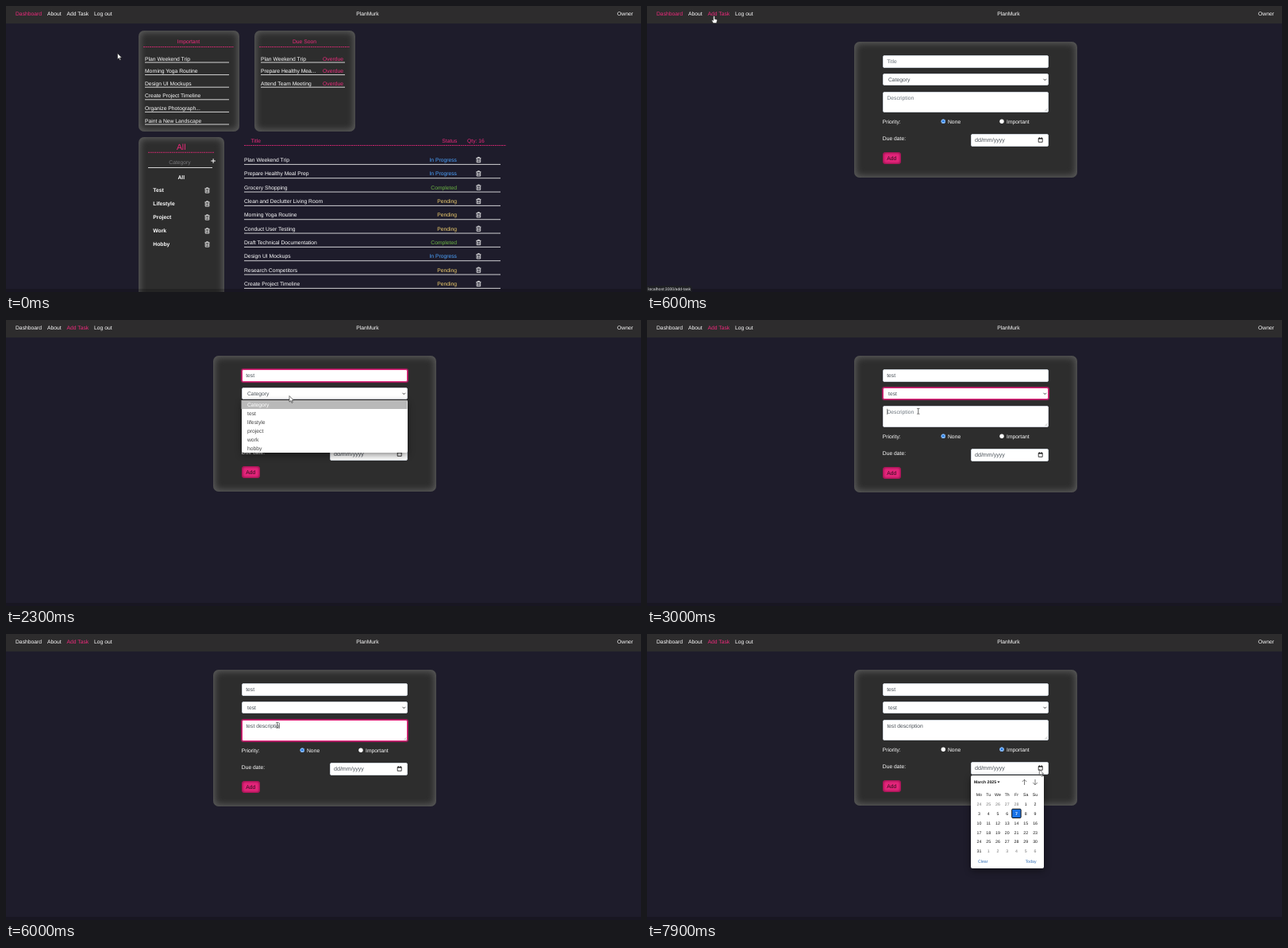
Write an HTML page that moves like this. It is 800 by 360 pixels and loops after 8 s.

```html
<!DOCTYPE html>
<html lang="en">
<head>
<meta charset="utf-8">
<title>Task manager</title>
<style>
  html, body { margin: 0; width: 100%; height: 100%; overflow: hidden; background: #1e1c2b; }
  #stage { position: relative; width: 800px; height: 360px; overflow: hidden; background: #1e1c2b; }
  #stage div, #stage svg { position: absolute; box-sizing: border-box; }
  #stage .layer, #stage .layer > svg { left: 0; top: 0; width: 800px; height: 360px; }
  svg { overflow: visible; }
  text { font: 6.75px "Liberation Sans", Arial, sans-serif; text-rendering: geometricPrecision; white-space: pre; }
  .card { background: #2d2d2d; border-radius: 7px; box-shadow: inset 0 0 9px 2px #5e5e5e; }
  .field { background: #fff; border-radius: 2px; border: .5px solid #ced4da; }
  .ring { border-radius: 2px; border: 1px solid #e0267b; box-shadow: 0 0 1px 1px #a31c5c; opacity: 0; }
  .add { background: #e3257a; border-radius: 4px; box-shadow: inset 0 0 3px 1px #8c0f48; }
  .list { background: #fff; border-radius: 2px; box-shadow: 0 3px 8px rgba(0, 0, 0, .45); }
</style>
</head>
<body>
<div id="stage"></div>
<script>
const PINK = '#ee2a7c', GRAY = '#6c757d', INK = '#495057';
const LOOP = 8000;
const $ = id => document.getElementById(id);

// Markup helpers; text is placed by its left, middle or right x and its centre y.
const text = (x, y, s, o = {}) => {
  const size = o.size || 6.75;
  return `<text x="${x}" y="${y + size * .355}" fill="${o.fill || '#fff'}" text-anchor="${o.at || 'start'}"
    style="font-size:${size}px;font-weight:${o.bold ? 700 : 400}" ${o.id ? `id="${o.id}"` : ''}>${s}</text>`;
};
const line = (x1, x2, y, color = '#fff', dash = '') =>
  `<path d="M${x1} ${y}H${x2}" stroke="${color}" stroke-width=".8" stroke-dasharray="${dash}"/>`;
const rule = (x1, x2, y) => line(x1, x2, y, PINK, '2 .7');
const box = (cls, x, y, w, h, id = '') =>
  `<div class="${cls}" id="${id}" style="left:${x}px;top:${y}px;width:${w}px;height:${h}px"></div>`;
const layer = (id, boxes, shapes) =>
  `<div class="layer" id="${id}">${boxes}<svg>${shapes}</svg></div>`;
const trash = (x, y) => `<g transform="translate(${x} ${y})" fill="none" stroke="#fff" stroke-width=".8">
  <path d="M-3-2.2H3M-1-2.4V-3.2H1V-2.4M-2.3-2V3.1H2.3V-2M-.8-.8V2M.8-.8V2"/></g>`;

function dashboard() {
  const important = ['Plan Weekend Trip', 'Morning Yoga Routine', 'Design UI Mockups',
    'Create Project Timeline', 'Organize Photograph...', 'Paint a New Landscape'];
  const due = ['Plan Weekend Trip', 'Prepare Healthy Mea...', 'Attend Team Meeting'];
  const status = { I: ['In Progress', '#4da3ff'], C: ['Completed', '#6cb644'], P: ['Pending', '#f2d06f'] };
  const tasks = ['I Plan Weekend Trip', 'I Prepare Healthy Meal Prep', 'C Grocery Shopping',
    'P Clean and Declutter Living Room', 'P Morning Yoga Routine', 'P Conduct User Testing',
    'C Draft Technical Documentation', 'I Design UI Mockups', 'P Research Competitors',
    'P Create Project Timeline'];
  let s = text(230, 44.5, 'Important', { fill: PINK, at: 'middle' }) + rule(173, 287, 51.5)
    + text(376, 44.5, 'Due Soon', { fill: PINK, at: 'middle' }) + rule(319, 433, 51.5);
  important.forEach((name, i) => {
    const y = 66.2 + i * 15.6;
    s += text(175, y, name) + line(175, 281, y + 4.8);
  });
  due.forEach((name, i) => {
    const y = 66.2 + i * 15.6;
    s += text(321, y, name) + text(399, y, 'Overdue', { fill: PINK }) + line(321, 427, y + 4.8);
  });
  s += text(220.7, 177, 'All', { fill: PINK, size: 10.4, at: 'middle' }) + rule(179, 262, 184.3)
    + text(219, 196.2, 'Category', { fill: '#77777a', at: 'middle' }) + line(179, 260, 203.5)
    + '<path d="M258.3 195H263.9M261.1 192.2V197.8" stroke="#fff"/>'
    + text(220.7, 215.2, 'All', { bold: 1, at: 'middle' });
  ['Test', 'Lifestyle', 'Project', 'Work', 'Hobby'].forEach((name, i) => {
    const y = 232 + i * 17;
    s += text(185.3, y, name, { bold: 1 }) + trash(253.5, y);
  });
  s += text(308.5, 169.6, 'Title', { fill: PINK }) + text(568.5, 169.6, 'Status', { fill: PINK, at: 'end' })
    + text(581, 169.6, 'Qty: 16', { fill: PINK }) + rule(300, 630, 175.5);
  tasks.forEach((task, i) => {
    const y = 193.6 + i * 17.33, [label, fill] = status[task[0]];
    s += text(300, y, task.slice(2)) + text(568, y, label, { fill, at: 'end' })
      + trash(595.4, y) + line(300, 623, y + 5.8);
  });
  return layer('dash', box('card', 167, 31, 127, 127) + box('card', 313, 31, 127, 127)
    + box('card', 167, 165, 108, 220), s);
}

function form() {
  const radio = (x, id) => `<circle cx="${x}" cy="145.2" r="2.7" fill="#fff"/>
    <g id="${id}"><circle cx="${x}" cy="145.2" r="2.3" fill="#fff" stroke="#1976e8" stroke-width=".8"/>
    <circle cx="${x}" cy="145.2" r="1.4" fill="#1976e8"/></g>`;
  const top = layer('top',
    box('card', 261, 45, 281, 171, 'card')
    + box('field', 296.5, 62, 209, 15.5) + box('field', 296.5, 84.8, 209, 15.7)
    + box('field', 296.5, 107.6, 209, 26, 'area')
    + box('ring', 296.5, 62, 209, 15.5, 'ring0') + box('ring', 296.5, 84.8, 209, 15.7, 'ring1')
    + box('ring', 296.5, 107.6, 209, 27, 'ring2'),
    text(302.2, 69.8, '', { id: 'title' })
    + text(304, 92.9, '', { id: 'category', fill: INK })
    + '<path d="M499.6 91.8L501.3 93.6L503 91.8" fill="none" stroke="#333" stroke-width=".9"/>'
    + text(302.4, 115.4, '', { id: 'desc' })
    + '<path id="caret" stroke="#222" stroke-width=".6"/>'
    + '<path id="grip" d="M501.3 132.3L504.3 129.3M503 132.3L504.3 131" stroke="#888" stroke-width=".5"/>');
  const low = layer('low',
    box('field', 407.5, 160.8, 98, 15.8) + box('add', 297, 184, 22.5, 14.5),
    text(296.8, 145.4, 'Priority:') + radio(373.3, 'radio0') + text(379, 145.4, 'None')
    + radio(447, 'radio1') + text(453, 145.4, 'Important')
    + text(296.8, 167, 'Due date:') + text(413, 168.8, 'dd/mm/yyyy', { size: 7.1, fill: INK })
    + '<path d="M493.2 166.6H498.2V171.3H493.2Z" fill="none" stroke="#111" stroke-width=".8"/>'
    + '<path d="M493 167H498.4M494.3 165.3V167M497.1 165.3V167" stroke="#111" stroke-width="1"/>'
    + text(302.2, 191.3, 'Add', { fill: '#2b0a19' }));
  const options = ['Category', 'test', 'lifestyle', 'project', 'work', 'hobby']
    .map((name, i) => text(304, 106.3 + i * 11, name, { id: 'opt' + i })).join('');
  const menu = layer('menu', box('list', 296.5, 100.8, 209, 66.2),
    '<rect id="mark" x="296.5" y="101" width="209" height="11" fill="#b9b9b9"/>' + options);
  return `<div class="layer" id="form">${top}${low}${menu}${calendar()}</div>`;
}

function calendar() {
  const size = 5.2, at = 'middle';
  let s = text(412, 186.2, 'March 2025', { size: 5.15, bold: 1, fill: '#111' })
    + '<path d="M441.3 185.5H444.5L442.9 187.4Z" fill="#111"/>'
    + '<path d="M475.5 190V183.3M472.7 186L475.5 183.2L478.3 186M489 183V189.7M486.2 187L489 189.8L491.8 187" fill="none" stroke="#444" stroke-width=".7"/>'
    + '<rect x="459.7" y="220.3" width="11.4" height="11.2" rx="1" fill="#1a73e8" stroke="#111" stroke-width="1"/>';
  const colX = c => 418.4 + c * 11.77;
  ['Mo', 'Tu', 'We', 'Th', 'Fr', 'Sa', 'Su'].forEach((d, c) => {
    s += text(colX(c), 201.8, d, { size, at, fill: '#111' });
  });
  for (let i = 0; i < 42; i++) {
    const n = i - 4, inside = n > 0 && n < 32;
    const day = n < 1 ? n + 28 : inside ? n : n - 31;
    s += text(colX(i % 7), 214.2 + Math.floor(i / 7) * 11.83, day,
      { size, at, bold: n === 7, fill: n === 7 ? '#fff' : inside ? '#111' : '#777' });
  }
  s += text(417, 286.4, 'Clear', { size, fill: '#2f6cb5' }) + text(490.5, 286.4, 'Today', { size, at: 'end', fill: '#2f6cb5' });
  return layer('calendar', box('list', 407.5, 177.5, 92, 117.5), s);
}

const nav = `<div style="left:0;top:0;width:800px;height:21.5px;background:#2d2c2d"></div>`;
const navText = text(12, 9.2, 'Dashboard', { id: 'nav0' }) + text(52, 9.2, 'About')
  + text(76.5, 9.2, 'Add Task', { id: 'nav1' }) + text(111, 9.2, 'Log out')
  + text(455.5, 9.2, 'PlanMurk', { at: 'middle' }) + text(790, 9.2, 'Owner', { at: 'end' });
const statusBar = `<g id="status"><path d="M0 352H54.5Q56.5 352 56.5 354V360H0Z" fill="#1f2024"/>
  ${text(1.3, 356.2, 'localhost:3000/add-task', { size: 5.1, fill: '#e8e8ea' })}</g>`;
const pointer = `<g id="cursor" stroke-linejoin="round">
  <path id="arrow" d="M0 0V7.6L1.8 6L3 8.8L4.2 8.3L3 5.6H5.3Z" fill="#fff" stroke="#222" stroke-width=".6"/>
  <path id="hand" d="M-.9 .2Q0-1 .8 .2V3.4L3.4 4Q4 4.3 3.8 5.4L3 8.6H-1L-3 5.3Q-2.9 4.2-.9 5.3Z" fill="#fff" stroke="#222" stroke-width=".5"/>
  <path id="beam" d="M-1.6-3.4H-.4L0-3L.4-3.4H1.6M0-3V3M-1.6 3.4H-.4L0 3L.4 3.4H1.6" fill="none" stroke="#222" stroke-width=".7"/></g>`;

$('stage').innerHTML = dashboard() + form()
  + '<div style="left:0;top:356px;width:800px;height:4px;background:rgba(0,0,0,.2)"></div>'
  + layer('chrome', nav, navText + statusBar + pointer);

// Pointer stops: time, x, y.
const path = [[0, 140.5, 59.5], [50, 140.5, 59.5], [500, 84.5, 13], [900, 84.5, 13], [1300, 357, 70],
  [2000, 357, 70], [2200, 357, 95.5], [2400, 357, 95.5], [2600, 344, 115], [2800, 344, 115],
  [2950, 341.8, 114.8], [6600, 341.8, 114.8], [6900, 447, 144.5], [7200, 447, 144.5], [7550, 494.3, 170.5], [8000, 494.3, 170.5]];
const shapes = [[0, 'arrow'], [450, 'hand'], [980, 'arrow'], [1280, 'beam'], [2150, 'arrow'], [2850, 'beam'], [6700, 'arrow']];
const focus = [[1300, 2300], [2300, 3000], [3000, 7000]];
const words = 'test description';
const titleKeys = [1500, 1600, 1700, 1850];
const descKeys = [...words].map((_, i) => i < 2 ? 4000 + i * 100 : 4190 + (i - 2) * 150);

const clamp = v => Math.max(0, Math.min(1, v));
const between = (t, a, b) => t >= a && t < b;
const show = (id, on) => { $(id).style.display = on ? '' : 'none'; };
const mix = k => `color-mix(in srgb, ${PINK} ${Math.round(k * 100)}%, #fff)`;
const typed = (keys, t) => keys.filter(k => k <= t).length;

function pointerAt(t) {
  const i = Math.max(1, path.findIndex(p => p[0] > t));
  const [a, x, y] = path[i - 1], [b, u, v] = path[i];
  const k = clamp((t - a) / (b - a)), e = k * k * (3 - 2 * k);
  return [x + (u - x) * e, y + (v - y) * e];
}

function setInput(id, value, hint) {
  $(id).textContent = value || hint;
  $(id).setAttribute('fill', value ? INK : GRAY);
}

function drawCaret(t) {
  const inTitle = between(t, 1300, 2300), inDesc = between(t, 3000, 7000);
  const keys = inTitle ? titleKeys : descKeys, n = typed(keys, t);
  const since = t - (n ? keys[n - 1] : inTitle ? 1300 : 3000);
  const on = (inTitle || inDesc) && since % 1000 < 500;
  show('caret', on);
  if (!on) return;
  const el = $(inTitle ? 'title' : 'desc');
  const x = +el.getAttribute('x') + (n ? el.getSubStringLength(0, n) : 0) + .3;
  $('caret').setAttribute('d', `M${x} ${inTitle ? 66.2 : 111.8}v7.2`);
}

function render(t) {
  show('dash', t < 600);
  show('form', t >= 600);
  $('nav0').style.fill = mix(1 - clamp((t - 620) / 150));
  $('nav1').style.fill = mix(clamp((t - 430) / 130));
  show('status', between(t, 480, 1150));

  const grown = between(t, 3000, 7000) ? 1 : 0;
  $('card').style.height = 171 + grown + 'px';
  $('area').style.height = 26 + grown + 'px';
  $('low').style.top = grown + 'px';
  $('grip').setAttribute('transform', `translate(0 ${grown})`);

  setInput('title', words.slice(0, typed(titleKeys, t)), 'Title');
  setInput('desc', words.slice(0, typed(descKeys, t)), 'Description');
  $('category').textContent = t < 2700 ? 'Category' : 'test';
  focus.forEach(([a, b], i) => {
    $('ring' + i).style.opacity = clamp((t - a) / 150) * (1 - clamp((t - b) / 150));
  });
  if (t >= 600) drawCaret(t);

  show('radio0', t < 7000);
  show('radio1', t >= 7000);
  show('menu', between(t, 2300, 2700));
  const row = t < 2500 ? 0 : 1;
  $('mark').setAttribute('y', 101 + row * 11);
  for (let i = 0; i < 6; i++) $('opt' + i).setAttribute('fill', i === row ? '#fff' : '#444');
  show('calendar', t >= 7650);

  const [x, y] = pointerAt(t);
  $('cursor').setAttribute('transform', `translate(${x} ${y})`);
  const shape = shapes.filter(s => s[0] <= t).pop()[1];
  ['arrow', 'hand', 'beam'].forEach(id => show(id, id === shape));
}

const start = performance.now();
function tick() {
  render((performance.now() - start) % LOOP);
  requestAnimationFrame(tick);
}
tick();
</script>
</body>
</html>
```
